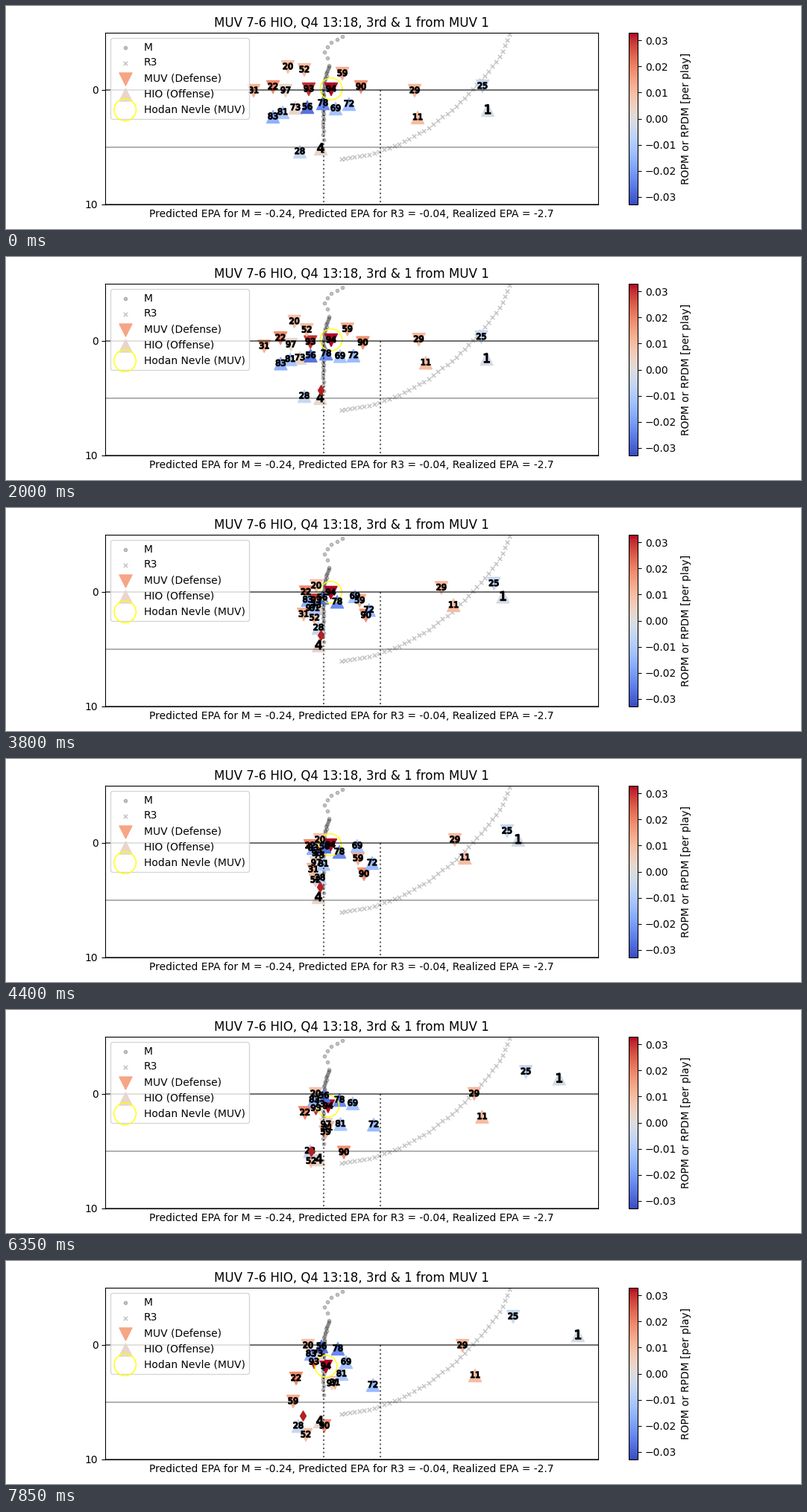
Recreate the animation shown at these times as a matplotlib script. Size 1066 px wide and 300 px high, loop 8000 ms.

```python
import numpy as np
import matplotlib.pyplot as plt
from matplotlib.animation import FuncAnimation
from matplotlib.cm import ScalarMappable
from matplotlib.colors import Normalize
from matplotlib.patheffects import withStroke

W, H, DPI = 1066, 300, 100
TICK, HOLD, STEP, LOOP = 50, 500, 150, 8000  # ms
SNAP, END = 4, 50  # steps at which the play starts and stops

rng = np.random.default_rng(4)
fig, ax = plt.subplots(figsize=(W / DPI, H / DPI), dpi=DPI)
cmap = plt.get_cmap("coolwarm")
norm = Normalize(-0.0329, 0.0329)
bar = fig.colorbar(ScalarMappable(norm, cmap), ax=ax)
bar.set_label("ROPM or RPDM [per play]")

# Axes units are stage pixels.
ax.set_xlim(133.25, 794.17)
ax.set_ylim(267, 36)
ax.set_xticks([])
ax.set_yticks([113, 267], ["0", "10"])
ax.set_title("MUV 7-6 HIO, Q4 13:18, 3rd & 1 from MUV 1")
ax.set_xlabel("Predicted EPA for M = -0.24, Predicted EPA for R3 = -0.04, "
              "Realized EPA = -2.7")
for y, alpha in ((113, 0.55), (190, 0.3), (267, 0.55)):
    ax.axhline(y, color="black", alpha=alpha)
for x in (425.5, 502):
    ax.plot([x, x], [113, 267], ":", color="black", alpha=0.6)


def hermite(points, u):
    """Smooth curve through evenly timed points, u from 0 to 1, starting at rest."""
    p = np.array(points, float)
    slope = np.gradient(p, axis=0)
    slope[0] = 0
    s = np.clip(u, 0, 1) * (len(p) - 1)
    i = min(int(s), len(p) - 2)
    s -= i
    rise = s * s * (3 - 2 * s)
    return (p[i] + (p[i + 1] - p[i]) * rise
            + slope[i] * s * (1 - s) ** 2 - slope[i + 1] * s * s * (1 - s))


def along(points, count, ease):
    """Spread count points along a polyline."""
    p = np.array(points, float)
    dist = np.r_[0, np.cumsum(np.hypot(*np.diff(p, axis=0).T))]
    at = dist[-1] * np.linspace(0, 1, count) ** ease
    return np.array([np.interp(at, dist, p[:, 0]), np.interp(at, dist, p[:, 1])])


faint = dict(color="black", alpha=0.22)
drop = along([(425, 180), (425.5, 113), (427, 100), (433, 80)], 34, 0.75)
drop[0] += rng.uniform(-0.7, 0.7, drop.shape[1])
release = along([(431, 70), (427, 62), (434, 50), (451, 41)], 6, 1)
ax.scatter(*np.hstack([drop, release]), s=10, label="M", **faint)
route = [(450, 206), (486, 200.5), (525, 187), (565, 165), (603, 136), (638, 99),
         (664, 66), (675, 38)]
ax.scatter(*along(route, 40, 1.1), s=15, marker="x", linewidths=1.2, label="R3", **faint)


class Team:
    """Each player: number, rating, then way points evenly spread over the play."""

    def __init__(self, marker, label, tint, *players):
        self.paths = [path for _, _, *path in players]
        ax.scatter([], [], s=150, marker=marker, color=[cmap(norm(tint))], label=label)
        self.dots = ax.scatter(*np.transpose([path[0] for path in self.paths]), s=150,
                               marker=marker, color=[cmap(norm(p[1])) for p in players])
        outline = [withStroke(linewidth=1, foreground="black")]
        self.tags = [ax.text(0, 0, str(p[0]), size=8 if p[0] > 9 else 12, ha="center",
                             va="center", path_effects=outline) for p in players]

    def move(self, u):
        spots = [hermite(path, u) for path in self.paths]
        self.dots.set_offsets(spots)
        for tag, spot in zip(self.tags, spots):
            tag.set_position(spot)
        return spots


defense = Team(
    "v", "MUV (Defense)", 0.0145,
    (94, .033, (436, 112), (435, 116), (429, 142)),
    (93, .030, (406, 112), (417, 127), (413, 136)),
    (22, .019, (358, 109), (408, 117), (389, 158)),
    (90, .018, (476, 109), (480, 155), (427, 222)),
    (59, .013, (451, 91), (472, 134), (385, 189)),
    (31, .012, (332, 114), (412, 149), (441, 164)),
    (29, .011, (548, 114), (571, 107), (628, 112), (612, 114)),
    (52, .010, (400, 86), (415, 163), (402, 234)),
    (20, .009, (378, 82), (421, 109), (405, 114)),
    (97, .003, (375, 114), (416, 140), (437, 165)),
    (25, -.005, (639, 108), (643, 105), (698, 88), (680, 75)))
offense = Team(
    "^", "HIO (Offense)", 0.003,
    (11, .010, (552, 150), (588, 131), (637, 139), (629, 154)),
    (73, .003, (388, 137), (420, 130), (418, 125)),
    (4, .003, (422, 192), (419, 186), (421, 216)),
    (1, -.002, (646, 140), (653, 127), (725, 93), (767, 100)),
    (28, -.005, (394, 196), (421, 160), (392, 222)),
    (81, -.011, (371, 143), (404, 132), (444, 152), (450, 152)),
    (69, -.012, (442, 138), (471, 117), (456, 136)),
    (72, -.014, (460, 132), (491, 140), (492, 167)),
    (83, -.016, (358, 149), (412, 120), (409, 125)),
    (78, -.023, (425, 131), (447, 125), (445, 118)),
    (56, -.027, (404, 136), (427, 118), (423, 115)))
ring = ax.scatter([436], [111], s=450, facecolors="none", edgecolors="yellow",
                  label="Hodan Nevle (MUV)")
ball_path = [(421, 182), (421, 172), (398, 208)]
ball = ax.scatter(*ball_path[0], s=45, marker="d", color="firebrick", zorder=4)
ax.legend(loc="upper left")


def draw(frame):
    t = frame * TICK
    step = 0 if t < HOLD else 1 + (t - HOLD) // STEP
    u = max(0, (step - SNAP) / (END - SNAP))
    star, *_ = defense.move(u)
    offense.move(u)
    ring.set_offsets([star - (0, 0.5)])
    ball.set_offsets([hermite(ball_path, u)])
    ball.set_visible(step > SNAP)
    return []


anim = FuncAnimation(fig, draw, frames=LOOP // TICK, init_func=lambda: draw(0),
                     interval=TICK, repeat=True, repeat_delay=0)
plt.show()
```
